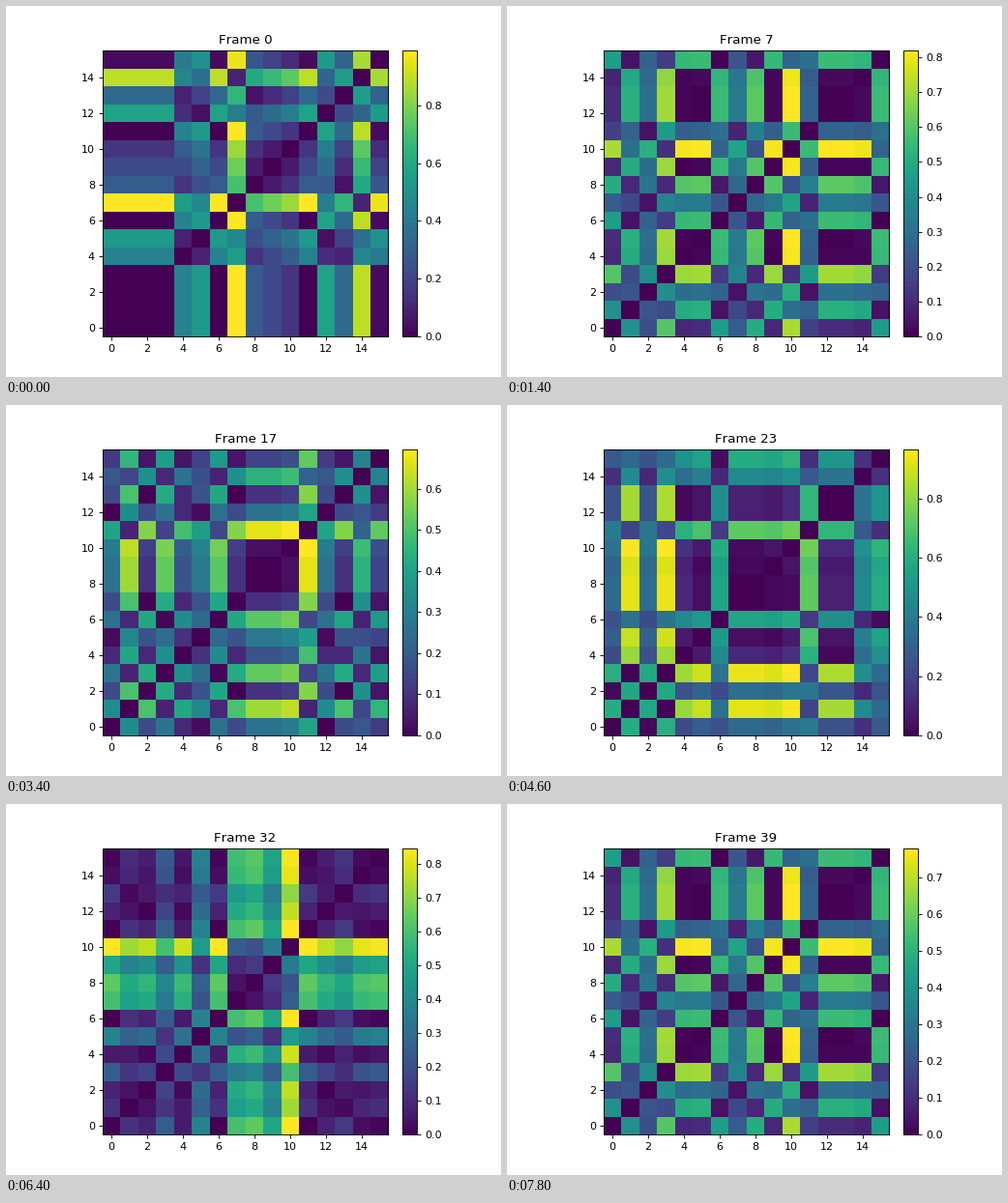
Write a matplotlib script that moves like this. It is 512 px wide and 384 px high and loops after 8 s.

```python
import numpy as np
import matplotlib.pyplot as plt
from matplotlib.animation import FuncAnimation

W, H, DPI = 512, 384, 80
FRAMES, STEP = 40, 200
plt.rcParams["text.kerning_factor"] = 6  # whole-pixel kerning

# Places of 16 points on a line; the map shows how far apart they are
START = np.array([0, 0, 0, 0, 44, 53, 0, 99, 29, 22, 15, 0, 57, 34, 89, 3])
HOME = np.array([69, 29, 50, 11, 78, 79, 25, 46, 20, 78, 0, 54, 79, 79, 77, 25])
SPLIT = np.array([41, 7, 57, 14, 49, 39, 15, 57, 67, 67, 70, 0, 41, 57, 22, 53])
WIDE = np.array([61, 1, 59, 0, 83, 90, 37, 94, 94, 92, 97, 21, 85, 85, 48, 34])
BUNCH = np.array([0, 12, 8, 25, 6, 38, 0, 60, 64, 50, 85, 0, 8, 14, 3, 1])

# The points drift away from HOME and come back to it mirrored:
# (frame, largest distance, pose)
ROUTE = [(0, 0.991, START), (7, 0.82, HOME), (13, 0.8375, HOME),
         (17, 0.696, SPLIT), (23, 0.967, WIDE), (32, 0.846, BUNCH),
         (39, 0.779, -HOME)]
KEYS, SPANS, POSES = zip(*ROUTE)


def distances(n):
    x = np.array([np.interp(n, KEYS, path) for path in zip(*POSES)])
    d = np.abs(x[:, None] - x)
    return d * np.interp(n, KEYS, SPANS) / d.max()


fig = plt.figure(figsize=(W / DPI, H / DPI), dpi=DPI)

# Square map with a bar of 5% width and 5% gap, centred as one block
side = 0.77 * H
left = 0.5125 * W - 0.55 * side
ax = fig.add_axes([left / W, 0.11, side / W, 0.77])
cax = fig.add_axes([(left + 1.05 * side) / W, 0.11, 0.05 * side / W, 0.77])

im = ax.imshow(distances(0), origin="lower", cmap="viridis", aspect="auto",
               interpolation="nearest", vmin=0, vmax=SPANS[0])
ax.set_xticks(range(0, 16, 2))
ax.set_yticks(range(0, 16, 2))
title = ax.set_title("Frame 0")
fig.colorbar(im, cax=cax)


def draw(n):
    d = distances(n)
    im.set_data(d)
    im.set_clim(0, d.max())
    title.set_text(f"Frame {n}")
    return im, title


def init():
    return draw(0)


anim = FuncAnimation(fig, draw, frames=FRAMES, init_func=init,
                     interval=STEP, repeat=True, repeat_delay=0, blit=False)
plt.show()
```
